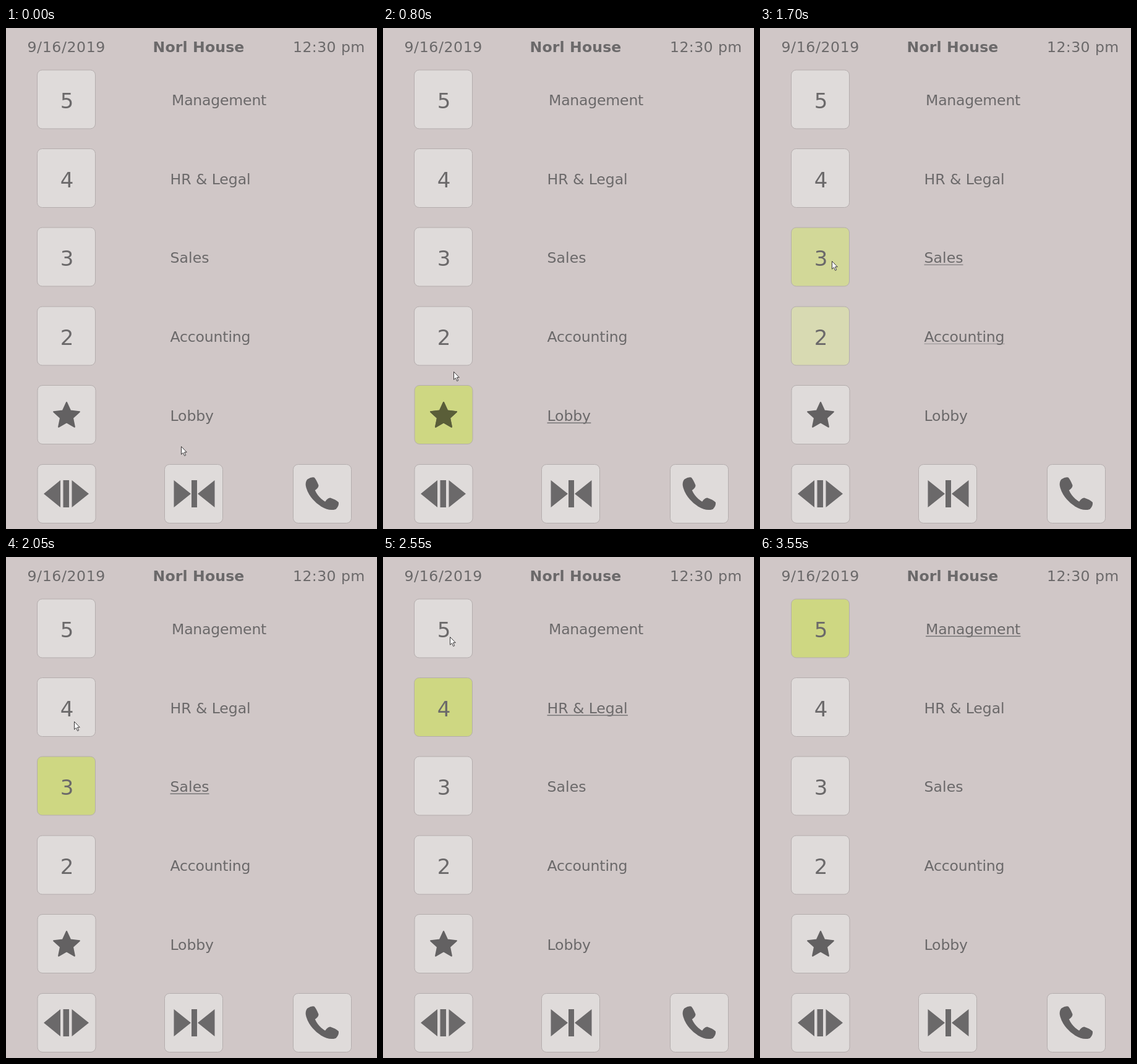
An HTML page for the animation above (4350 ms loop, 600x811 px).

```html
<!DOCTYPE html>
<html lang="en">
<head>
<meta charset="utf-8">
<title>Elevator panel</title>
<style>
  html, body { margin: 0; width: 100%; height: 100%; overflow: hidden; background: #d0c7c7; }
  svg { display: block; width: 100%; height: 100%; }
  text { font: 23.6px "DejaVu Sans", sans-serif; fill: #6b696a; }
  .title { font-weight: bold; }
  .digit { font-size: 34px; text-anchor: middle; }
  .key { fill: #dfdbda; }
  .lit { fill: #ced782; }
  .edge { fill: none; stroke: #b4adad; }
  .icon { fill: #6b696a; }
  .dark { fill: #636162; stroke: #636162; stroke-width: 2; stroke-linejoin: round; }
  .olive { fill: #5a5e38; stroke: #5a5e38; }
  .line { fill: #7b797a; }
</style>
</head>
<body>
<svg id="stage" viewBox="0 0 600 811">
  <g id="panel"></g>
  <path class="icon" d="M61 754 88 732V776ZM92.500 732H102V776H92.500ZM134 754 106.500 732V776Z"/>
  <path class="icon" d="M299 754 271.500 732V776ZM300 732H309V776H300ZM310 754 337.500 732V776Z"/>
  <path class="dark" stroke-width="1" d="M488.500 731Q494 727.500 498 728.500Q501 732 504.500 740.500Q504.500 744 498.500 748Q504 761 516.500 768Q520.500 761.500 524 761.500Q533.500 764.500 537 768.500Q537.500 773.500 533 778Q523 781.500 510.500 774Q492 762 486.500 744Q484 736 488.500 731Z"/>
  <path id="cursor" fill="#fff" stroke="#3a3839" stroke-linejoin="round" d="M.5 .5V13.200L3.400 10.500 5.700 15.500 7.700 14.600 5.500 9.700H9.300Z"/>
</svg>
<script>
const LOOP = 4350, STEP = 50;
const SVG = "http://www.w3.org/2000/svg";
const panel = document.getElementById("panel");
const cursor = document.getElementById("cursor");

function add(tag, attrs, text) {
  const el = document.createElementNS(SVG, tag);
  for (const name in attrs) el.setAttribute(name, attrs[name]);
  if (text) el.textContent = text;
  panel.append(el);
  return el;
}

function label(text, x, y, spacing, cls = "") {
  return add("text", { x, y, class: cls, style: `letter-spacing:${spacing}px` }, text);
}

// Returns the coloured layer that shows while the button is lit.
function button(x, y) {
  const box = cls => add("rect", { x, y, width: 94, height: 95, rx: 8, class: cls });
  box("key");
  const lit = box("lit");
  lit.setAttribute("opacity", 0);
  box("edge");
  return lit;
}

function starPath(cx, cy, outer, inner) {
  const points = Array.from({ length: 10 }, (_, i) => {
    const r = i % 2 ? inner : outer, a = (i / 5 - 0.5) * Math.PI;
    return `${(cx + r * Math.cos(a)).toFixed(2)} ${(cy + r * Math.sin(a)).toFixed(2)}`;
  });
  return `M${points.join("L")}Z`;
}

label("9/16/2019", 34.5, 39, 0.6);
label("Norl House", 237.5, 39, 0.13, "title");
label("12:30 pm", 464, 39, 0.4);

// Listed in the order in which they light up.
const floors = [
  { key: "", name: "Lobby", x: 265.5, y: 578.5, width: 70.8, spacing: -0.14, on: 450 },
  { key: "2", name: "Accounting", x: 265.5, y: 451, width: 130, spacing: -0.19, on: 1100 },
  { key: "3", name: "Sales", x: 265.5, y: 323, width: 63, spacing: 0.08, on: 1700 },
  { key: "4", name: "HR & Legal", x: 265.5, y: 195.5, width: 130.5, spacing: -0.07, on: 2200 },
  { key: "5", name: "Management", x: 268, y: 68, width: 153.5, spacing: -0.23, on: 2700 }
];

floors.forEach((floor, i) => {
  const { key, name, x, y, width, spacing } = floor;
  const base = Math.round(y + 57);
  floor.off = i + 1 < floors.length ? floors[i + 1].on : LOOP;
  floor.layers = [button(key ? 50.5 : 51, y)];
  if (key) {
    add("text", { x: 98.5, y: y + 62, class: "digit" }, key);
  } else {
    const d = starPath(98, 628, 22, 10.5);
    add("path", { d, class: "dark" });
    floor.layers.push(add("path", { d, class: "dark olive", opacity: 0 }));
  }
  label(name, x, base, spacing);
  floor.layers.push(add("rect", { x, y: base + 2.5, width, height: 1.6, class: "line", opacity: 0 }));
});

[51, 256.5, 464.5].forEach(x => button(x, 706.5));

// Pointer tip: time, x, y
const path = [
  [0, 283, 677], [50, 268, 674], [100, 222, 660], [150, 165, 642], [200, 128, 631], [250, 116, 628],
  [600, 116, 628], [700, 115, 603], [800, 114, 556], [900, 114, 526], [1050, 114, 511],
  [1200, 114, 511], [1300, 114, 488], [1450, 115, 425], [1550, 116, 388], [1650, 116, 377],
  [1750, 116, 377], [1800, 113, 369], [1850, 102, 347], [1900, 93, 318], [1950, 91, 292],
  [2000, 100, 273], [2050, 110, 266], [2300, 110, 266], [2400, 110, 220], [2500, 108, 145],
  [2550, 108, 129], [3150, 108, 128], [3200, 106, 131], [3250, 126, 150], [3300, 188, 190],
  [3350, 247, 214], [3499, 247, 214], [3500, 471, 208], [LOOP, 471, 208]
];
const HIDE = 3550;

function tip(t) {
  const i = path.findIndex(point => point[0] > t);
  const [t0, x0, y0] = path[i - 1], [t1, x1, y1] = path[i];
  const k = (t - t0) / (t1 - t0);
  return [x0 + (x1 - x0) * k, y0 + (y1 - y0) * k];
}

function glow({ on, off }, t) {
  if (t < on) return 0;
  if (t < on + STEP) return 0.75;
  if (t < off) return 1;
  return t < off + STEP ? 0.45 : 0;
}

function draw() {
  const t = Math.floor((performance.now() % LOOP) / STEP) * STEP;
  for (const floor of floors) {
    const level = glow(floor, t);
    floor.layers.forEach(el => el.setAttribute("opacity", level));
  }
  cursor.setAttribute("transform", `translate(${tip(t)})`);
  cursor.setAttribute("visibility", t < HIDE ? "visible" : "hidden");
  requestAnimationFrame(draw);
}
draw();
</script>
</body>
</html>
```
